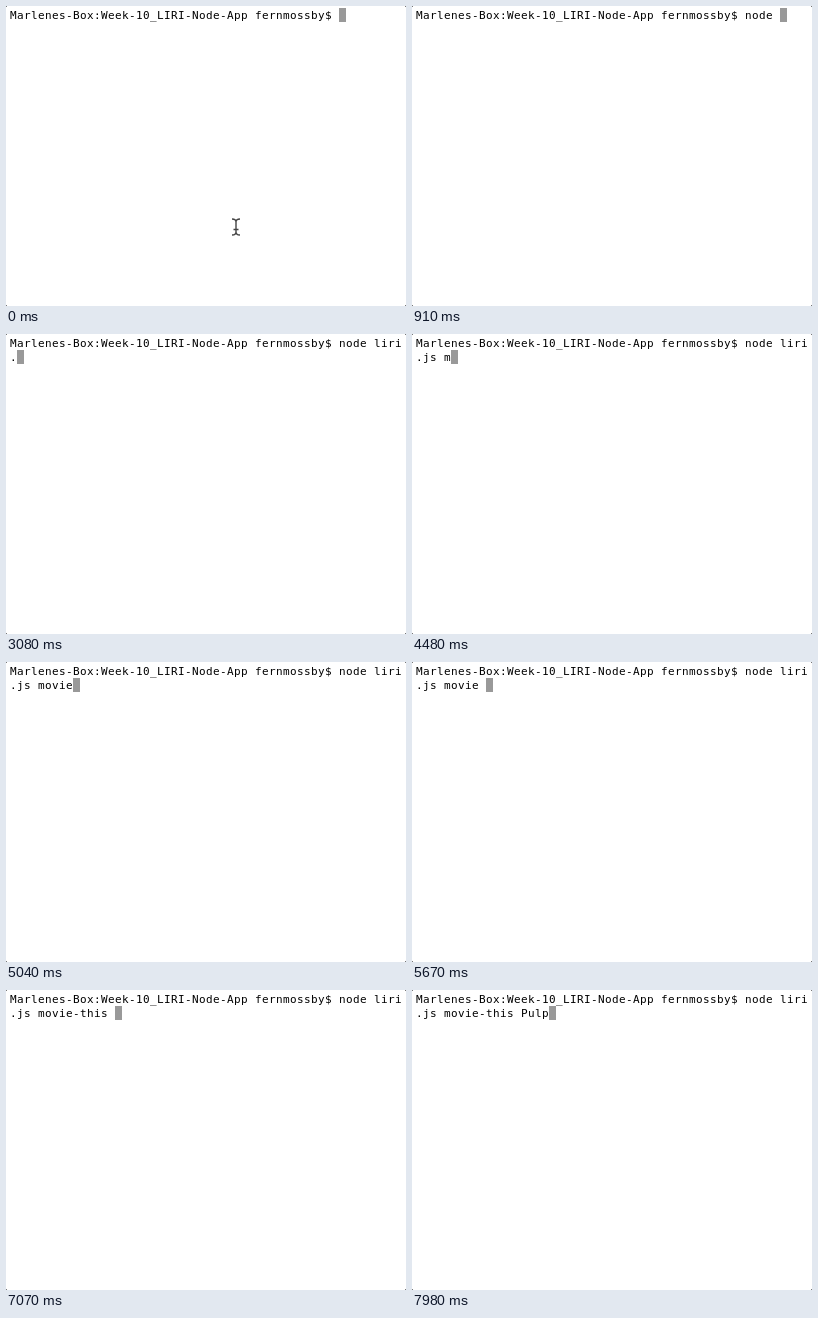
An HTML page with a canvas for the animation above (8 s loop, 400 px wide and 300 px high).

```html
<!DOCTYPE html>
<html lang="en">
<head>
<meta charset="utf-8">
<title>Terminal typing</title>
<style>
  html, body { margin: 0; width: 100%; height: 100%; overflow: hidden; background: #fff; }
  canvas { display: block; }
</style>
</head>
<body>
<canvas id="stage" width="400" height="300"></canvas>
<script>
const ctx = document.getElementById('stage').getContext('2d');
const LOOP = 8000;
const COLUMNS = 56, CELL_W = 7, CELL_H = 14, LEFT = 4, TOP = 2;
const PROMPT = 'Marlenes-Box:Week-10_LIRI-Node-App fernmossby$ ';
const POINTER_HIDES = 210;

// Keystrokes as [time in ms, key]; '<' is backspace.
const KEYS = [
  [210, 'n'], [350, 'o'], [490, 'd'], [630, 'e'], [910, ' '],
  [1120, 'l'], [1400, 'i'], [1610, 'r'], [1960, 'i'],
  [3080, '.'], [3430, 'j'], [3640, 's'], [3990, ' '],
  [4480, 'm'], [4620, 'o'], [4760, 'v'], [4830, 'i'], [4970, 'e'],
  [5110, ' '], [5320, 't'], [5670, '<'], [5880, '<'], [6090, '-'],
  [6370, 't'], [6510, 'h'], [6650, 'i'], [6790, 's'], [7070, ' '],
  [7280, 'P'], [7560, 'u'], [7770, 'l'], [7980, 'p']
];

function textAt(time) {
  return KEYS.filter(([at]) => at <= time)
    .reduce((text, [, key]) => key === '<' ? text.slice(0, -1) : text + key, PROMPT);
}

function cell(index) {
  return [LEFT + index % COLUMNS * CELL_W, TOP + Math.floor(index / COLUMNS) * CELL_H];
}

function drawPointer(x, y) {
  ctx.strokeStyle = '#444';
  ctx.lineWidth = 1.4;
  ctx.beginPath();
  ctx.moveTo(x - 4, y - 8);
  ctx.quadraticCurveTo(x, y - 8, x, y - 5);
  ctx.lineTo(x, y + 5);
  ctx.quadraticCurveTo(x, y + 8, x - 4, y + 8);
  ctx.moveTo(x + 4, y - 8);
  ctx.quadraticCurveTo(x, y - 8, x, y - 5);
  ctx.moveTo(x, y + 5);
  ctx.quadraticCurveTo(x, y + 8, x + 4, y + 8);
  ctx.moveTo(x - 2.5, y + 2.5);
  ctx.lineTo(x + 2.5, y + 2.5);
  ctx.stroke();
}

function draw(time) {
  ctx.fillStyle = '#fff';
  ctx.fillRect(0, 0, 400, 300);

  ctx.fillStyle = '#777';
  for (const x of [0, 399]) for (const y of [0, 299]) ctx.fillRect(x, y, 1, 1);

  const text = textAt(time);
  ctx.fillStyle = '#999';
  ctx.fillRect(...cell(text.length), CELL_W, CELL_H);

  ctx.fillStyle = '#000';
  ctx.font = '11px "DejaVu Sans Mono", monospace';
  [...text].forEach((char, i) => {
    const [x, y] = cell(i);
    ctx.fillText(char, x, y + 11);
  });

  if (time < POINTER_HIDES) drawPointer(230, 221);
}

const start = performance.now();
function tick() {
  draw((performance.now() - start) % LOOP);
  requestAnimationFrame(tick);
}
tick();
</script>
</body>
</html>
```
